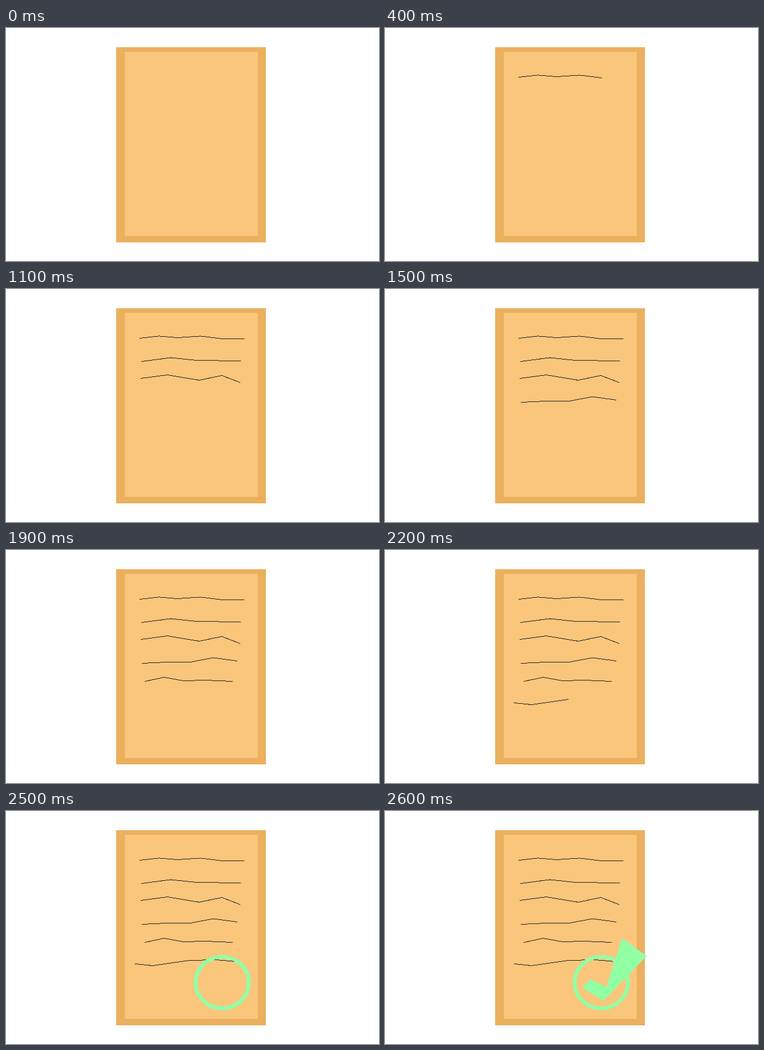
An HTML page for the animation above (2.9 s loop, 640 by 400 pixels).

```html
<!DOCTYPE html>
<html lang="en">
<head>
<meta charset="utf-8">
<title>Checked note</title>
<style>
  html, body { margin: 0; width: 100%; height: 100%; overflow: hidden; background: #fff; }
  svg { display: block; width: 640px; height: 400px; }
  #ink { fill: none; stroke: #222; stroke-width: 1; stroke-linecap: square; }
  .mark { visibility: hidden; }
</style>
</head>
<body>
<svg viewBox="0 0 640 400" shape-rendering="crispEdges">
  <rect x="189" y="33" width="257" height="335" fill="#ebb05e"/>
  <rect x="204" y="41" width="228" height="316" fill="#fac67c"/>
  <g id="ink" transform="translate(.5 .5)"></g>
  <ellipse id="ring" class="mark" cx="371" cy="294.5" rx="45.7" ry="44.2"
    fill="none" stroke="#93ffa5" stroke-width="6.6"/>
  <polygon id="tick" class="mark" points="407,218 449,249 375,326 338,303 353,289 380,302" fill="#93ffa5"/>
</svg>
<script>
const LOOP = 2900, STEP = 100;

// Each stroke: time of its first segment, then its points in writing order.
// A segment with several points appears in one go.
const strokes = [
  [100, '229,84', '262,80.4', '294,83', '333,80.4', '371,85', '408,85'],
  [600, '402,123', '326,122', '282,117.4', '232,124'],
  [900, '231,153', '276,147', '331,156', '370,148 401,160'],
  [1200, '396,190', '355,184.4', '316,192', '275,192', '233,194'],
  [1600, '238,225', '271,218', '304,224', '342,223', '388,225'],
  [2100, '221,262', '251,265', '314,256', '360,255', '394,258']
];

const byId = id => document.getElementById(id);
const parts = [];

for (const [start, ...points] of strokes) {
  for (let i = 1; i < points.length; i++) {
    const line = document.createElementNS('http://www.w3.org/2000/svg', 'polyline');
    const from = points[i - 1].split(' ').pop();
    line.setAttribute('points', from + ' ' + points[i]);
    line.setAttribute('class', 'mark');
    byId('ink').append(line);
    parts.push({ el: line, at: start + (i - 1) * STEP });
  }
}
parts.push({ el: byId('ring'), at: 2500 }, { el: byId('tick'), at: 2600 });

function draw() {
  const t = performance.now() % LOOP;
  for (const { el, at } of parts) el.style.visibility = t >= at ? 'visible' : 'hidden';
  requestAnimationFrame(draw);
}
draw();
</script>
</body>
</html>
```
